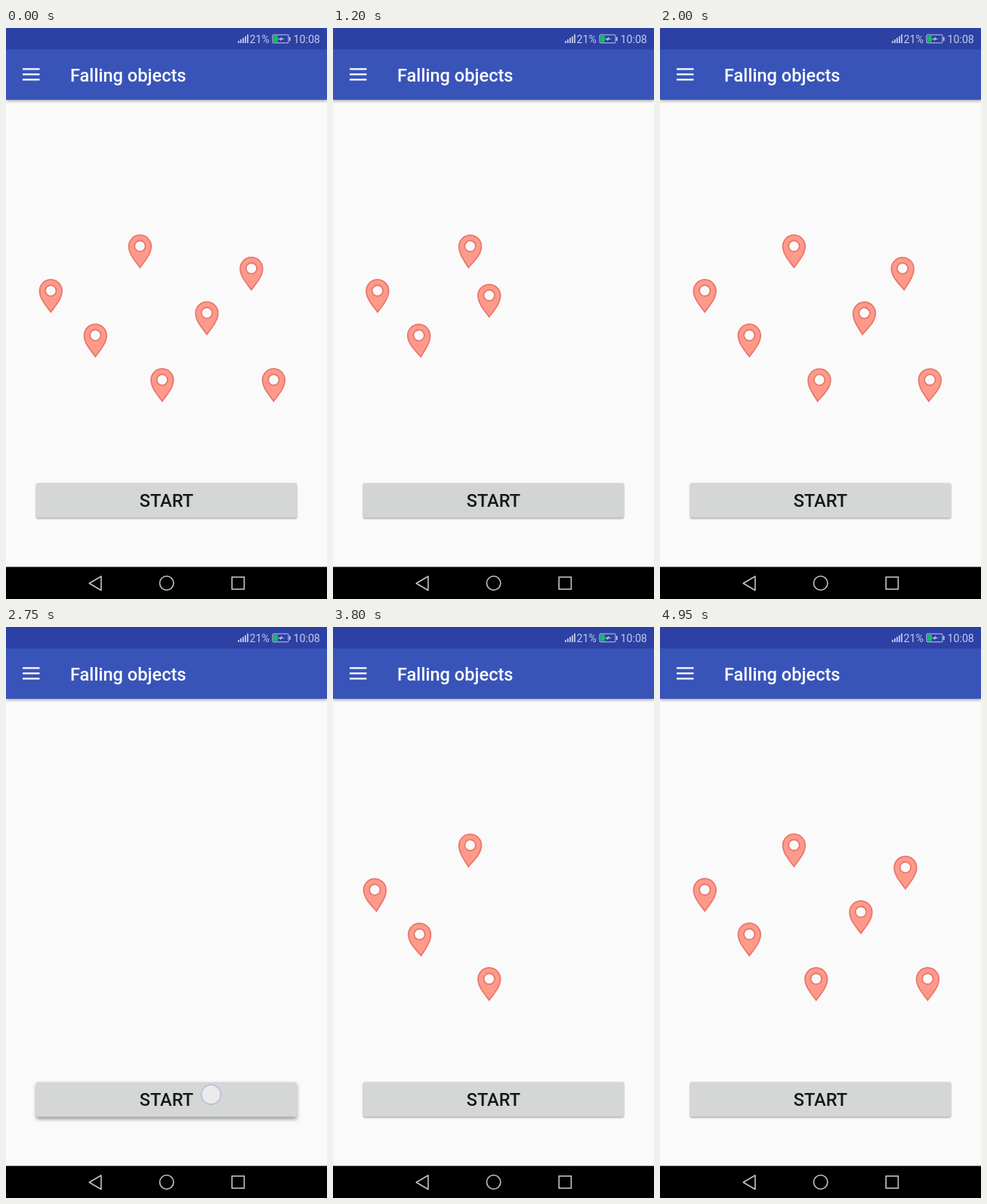
An HTML page for the animation above (5050 ms loop, 425 by 756 pixels).

```html
<!DOCTYPE html>
<html lang="en">
<head>
<meta charset="utf-8">
<title>Falling objects</title>
<style>
  html, body { margin: 0; width: 100%; height: 100%; overflow: hidden; background: #fafafa; }
  svg { display: block; width: 425px; height: 756px; font-family: Roboto, sans-serif; }
  #button { filter: drop-shadow(0 1.5px 1.2px #0006); }
  #button.pressed { filter: drop-shadow(0 3px 2.4px #0006); }
  #bar { filter: drop-shadow(0 1.5px 2px #0007); }
</style>
</head>
<body>
<svg viewBox="0 0 425 756">
  <defs>
    <clipPath id="field"><rect y="213" width="425" height="380"/></clipPath>
    <clipPath id="face"><rect x="40" y="602.5" width="345" height="46" rx="2"/></clipPath>
    <g id="pin" stroke="#e8786c" stroke-width="1.8">
      <path fill="#ff9a8b" d="M0-.9C-5-8-14.8-18-14.8-29a14.8 14.8 0 0 1 29.6 0C14.8-18 5-8 0-.9Z"/>
      <circle cy="-29.3" r="7.2" fill="#fafafa"/>
    </g>
  </defs>
  <rect width="425" height="756" fill="#fafafa"/>

  <rect id="bar" y="28" width="425" height="67" fill="#3954b9"/>
  <rect width="425" height="28.5" fill="#2c41a3"/>
  <path d="M22 54.4h22.5M22 61.4h22.5M22 68.4h22.5" stroke="#fff" stroke-width="2.4"/>
  <text x="85" y="71" font-size="23.6" font-weight="500" fill="#fff">Falling objects</text>
  <g fill="#c2cae9" font-size="14.2">
    <path d="M308 20v-3M311 20v-5M314 20v-7M317 20v-9M320 20v-11.5" stroke="#c2cae9" stroke-width="1.8"/>
    <text x="322.5" y="19.5">21%</text>
    <text x="380.5" y="19.8">10:08</text>
    <rect x="353" y="9" width="21" height="10.8" rx="1" fill="none" stroke="#c2cae9"/>
    <rect x="354.2" y="10.2" width="5.6" height="8.4" fill="#10c060"/>
    <rect x="375" y="12" width="1.6" height="5"/>
    <path d="M359 14.5l5-1v-2l1.5 2.3 3.5.7-5 1v2l-1.5-2.3Z"/>
  </g>

  <g id="button">
    <rect x="40" y="602.5" width="345" height="46" rx="2" fill="#d5d7d6"/>
  </g>
  <g clip-path="url(#face)" fill="#37474f">
    <rect id="tint" x="40" y="602" width="345" height="47"/>
    <circle id="ripple" cy="625"/>
  </g>
  <text x="212.5" y="634" font-size="23.6" font-weight="500" fill="#161717" text-anchor="middle">START</text>
  <circle id="touch" cx="271.5" cy="619" r="13" fill="#ebebec" stroke="#b9c0df" stroke-width="1.8"/>

  <g id="pins" clip-path="url(#field)"></g>

  <rect y="713.5" width="425" height="43" fill="#000"/>
  <g fill="none" stroke="#c4c4c4" stroke-width="1.6">
    <path d="M110.2 735.2 126 726v18.5Z" stroke-linejoin="round"/>
    <circle cx="212.7" cy="735" r="9.2"/>
    <rect x="299.2" y="727" width="16.2" height="16"/>
  </g>
</svg>
<script>
const LOOP = 5050, STEP = 50, SECOND_RUN = 2560;
const FALL = 110, PERIOD = 280, TILT = 5.3, PIVOT = 22;
const CLEARED = 130;

// tip x, tip y, drop time, sway time, first direction, swings
const pins = [
  [59.3, 377, 650, 776, 1, 2],
  [118.3, 436, 805, 860, -1, 3],
  [177.4, 318, 1000, 1150, 1, 2],
  [206.8, 495, 1120, 1251, -1, 3],
  [265.9, 406.5, 1250, 1363, 1, 3],
  [324.9, 347.5, 1288, 1399, -1, 3.5],
  [354.4, 495, 1505, 1550, -1, 3]
].map(([x, y, drop, sway, dir, swings]) => {
  const node = document.createElementNS("http://www.w3.org/2000/svg", "use");
  node.setAttribute("href", "#pin");
  document.getElementById("pins").append(node);
  return { x, y, drop, sway, dir, swings, node };
});

const get = id => document.getElementById(id);
const button = get("button"), tint = get("tint"), ripple = get("ripple"), touch = get("touch");
const ramp = (t, from, to) => Math.min(1, Math.max(0, (t - from) / (to - from)));

function drawPin(p, t) {
  const waiting = t < CLEARED;
  const fall = waiting ? 1 : ramp(t, p.drop, p.drop + FALL);
  const swing = (t - p.sway) / PERIOD;
  const angle = swing > 0 && swing < p.swings
    ? p.dir * TILT * Math.sin(swing * 2 * Math.PI) : 0;
  const top = 213 + 45;
  const y = top + (p.y - top) * fall * fall;
  p.node.setAttribute("visibility", waiting || t >= p.drop ? "visible" : "hidden");
  p.node.setAttribute("transform", `translate(${p.x} ${y}) rotate(${angle} 0 ${PIVOT})`);
}

function drawButton(t) {
  const fade = 1 - ramp(t, 850, 1230);
  const grow = ramp(t, 300, 1250);
  button.classList.toggle("pressed", t >= 50 && t < 500);
  touch.setAttribute("opacity", t >= 50 ? 1 - ramp(t, 220, 320) : 0);
  tint.setAttribute("opacity", 0.06 * ramp(t, 220, 450) * fade);
  ripple.setAttribute("cx", 271.5 - 59 * grow);
  ripple.setAttribute("r", 200 * grow);
  ripple.setAttribute("opacity", 0.03 * fade);
}

function frame(now) {
  const time = Math.floor(now % LOOP / STEP) * STEP;
  const t = time < SECOND_RUN ? time : time - SECOND_RUN;
  pins.forEach(p => drawPin(p, t));
  drawButton(t);
  requestAnimationFrame(frame);
}
frame(performance.now());
</script>
</body>
</html>
```
